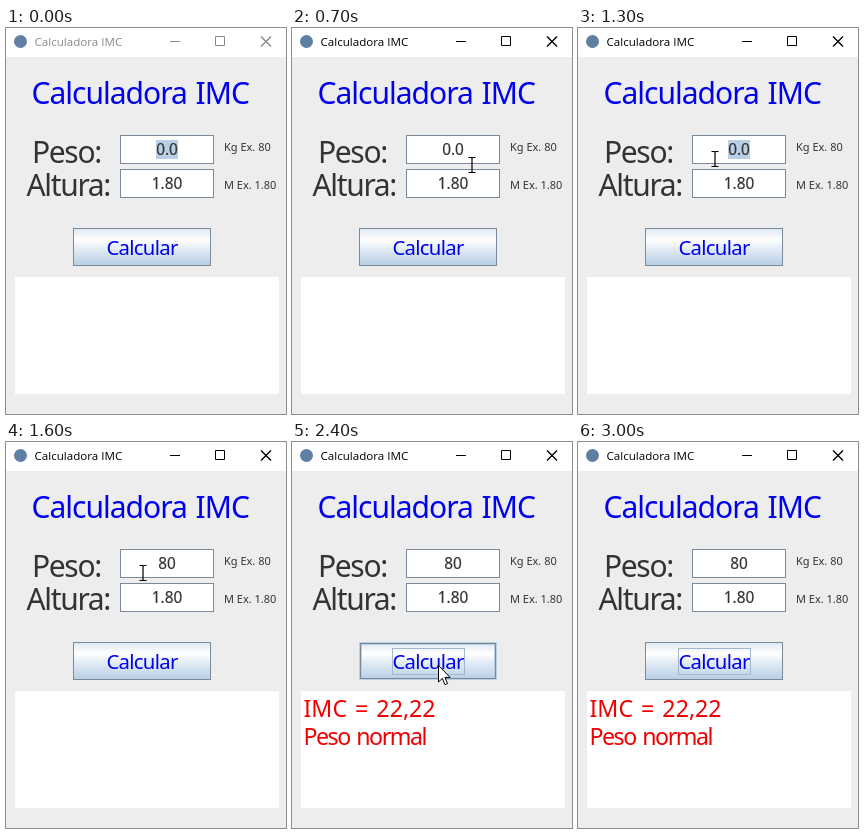
An HTML page for the animation above (3100 ms loop, 280 by 386 pixels).

```html
<!DOCTYPE html>
<html lang="es">
<head>
<meta charset="utf-8">
<title>Calculadora IMC</title>
<style>
html, body { margin: 0; width: 100%; height: 100%; overflow: hidden; background: #ededed; }
svg { display: block; width: 100vw; height: 100vh; }
text { font-family: "Noto Sans", "Open Sans", sans-serif; fill: #333; white-space: pre; }
.caption { font: 11.6px "Open Sans", "Noto Sans", sans-serif; }
.big { font-size: 30px; letter-spacing: -1px; word-spacing: 2px; }
.label { letter-spacing: -1.35px; }
.blue { fill: #00e; }
.hint { font-size: 11px; }
.value { font-size: 15.4px; text-anchor: middle; stroke: #333; stroke-width: .2; }
.out { font-size: 23.2px; fill: #f00000; word-spacing: 2px; }
.box { fill: #fff; stroke: #7a8a99; }
.edge { fill: none; stroke: #b8cfe5; }
</style>
</head>
<body>
<svg viewBox="0 0 280 386">
  <defs>
    <linearGradient id="ocean" x2="0" y2="1">
      <stop offset="0" stop-color="#dde8f3"/>
      <stop offset=".3" stop-color="#fff"/>
      <stop offset=".6" stop-color="#dde8f3"/>
      <stop offset="1" stop-color="#b8cfe5"/>
    </linearGradient>
  </defs>
  <rect width="280" height="386" fill="#ededed"/>
  <rect width="280" height="29" fill="#fff"/>
  <circle cx="14.5" cy="13.5" r="6.5" fill="#5f7fa3"/>
  <text id="caption" class="caption" x="28.5" y="18">Calculadora IMC</text>
  <g id="controls" fill="none">
    <path d="M164 13.5h10M209.5 8.5h9v9h-9z"/>
    <path d="M255 8.5l10 10m0-10l-10 10" stroke-width="1.4"/>
  </g>

  <text class="big blue" x="25.5" y="76">Calculadora IMC</text>
  <text class="big label" x="26" y="134.5">Peso:</text>
  <text class="big label" x="20.5" y="168">Altura:</text>
  <rect class="box" x="114.5" y="107.5" width="93" height="28"/>
  <rect class="box" x="114.5" y="141.5" width="93" height="28"/>
  <rect id="selection" y="112" height="19" fill="#b8cfe5"/>
  <text id="weight" class="value" x="161" y="127"></text>
  <text class="value" x="161" y="161">1.80</text>
  <text class="hint" x="218" y="123">Kg Ex. 80</text>
  <text class="hint" x="218" y="161">M Ex. 1.80</text>

  <rect x="67.5" y="200.5" width="137" height="37" fill="url(#ocean)" stroke="#7a8a99"/>
  <g id="hover">
    <rect class="edge" x="67.5" y="200.5" width="137" height="37"/>
    <rect class="edge" x="69.5" y="202.5" width="133" height="33"/>
    <rect x="68.5" y="201.5" width="135" height="35" fill="none" stroke="#7a8a99"/>
  </g>
  <rect id="focus" x="100.5" y="206.5" width="72" height="26" fill="none" stroke="#a3b8cc"/>
  <text class="blue" x="100.5" y="227" font-size="20.3" letter-spacing="-.7">Calcular</text>

  <rect x="9" y="249" width="264" height="117" fill="#fff"/>
  <g id="result">
    <text class="out" x="11.5" y="275">IMC = 22,22</text>
    <text class="out" x="11.5" y="303" letter-spacing="-1.5">Peso normal</text>
  </g>

  <path id="beam" d="M-3.5-7.5h2.5q1 0 1 1q0-1 1-1h2.5M0-6.5v13M-3.5 7.5h2.5q1 0 1-1q0 1 1 1h2.5" fill="none" stroke="#000" stroke-width="1.2"/>
  <path id="arrow" d="M.5.5v16.5l3.8-3.6 2.7 6.3 2.6-1.1-2.7-6.2h5.2z" fill="#fff" stroke="#000"/>
</svg>
<script>
const LOOP = 3100, STEP = 100;
const el = id => document.getElementById(id);
const show = (id, on) => el(id).setAttribute("visibility", on ? "visible" : "hidden");

// Pointer keys: time, x, y
const path = [
  [400, 240, 290], [500, 215, 153], [700, 180, 137], [900, 172, 134],
  [1200, 137, 131], [1700, 137, 131], [1900, 45, 165], [2000, 21, 188],
  [2100, 46, 202], [2300, 142, 222], [2400, 146, 223], [2500, 150, 222],
  [2900, 279, 82]
];

function pointer(t) {
  const i = path.findIndex(k => k[0] > t);
  if (i < 0) return path[path.length - 1].slice(1);
  const [a, b] = [path[Math.max(i - 1, 0)], path[i]];
  const p = Math.max(0, (t - a[0]) / (b[0] - a[0]));
  return [1, 2].map(n => a[n] + (b[n] - a[n]) * p);
}

function selectionStart(t) {
  if (t < 700) return 150;
  if (t < 900 || t >= 1400) return 172;
  return t < 1000 ? 163 : t < 1100 ? 159 : 150;
}

function draw(ms) {
  const t = Math.floor(ms % LOOP / STEP) * STEP;
  const active = t >= 700;
  el("caption").style.fill = active ? "#000" : "#888";
  el("controls").setAttribute("stroke", active ? "#000" : "#888");

  const left = selectionStart(t);
  el("selection").setAttribute("x", left);
  el("selection").setAttribute("width", 172 - left);
  el("weight").textContent = t < 1400 ? "0.0" : t < 1600 ? "8" : "80";

  const [x, y] = pointer(t);
  const inside = t >= 400 && t < 3000;
  const beam = t < 1800;
  for (const id of ["beam", "arrow"]) el(id).setAttribute("transform", `translate(${x} ${y})`);
  show("beam", inside && beam);
  show("arrow", inside && !beam);
  show("hover", inside && !beam && x > 67 && x < 205 && y > 200 && y < 238);
  show("focus", t >= 2400);
  show("result", t >= 2400);
}

const start = performance.now();
function tick() {
  draw(performance.now() - start);
  requestAnimationFrame(tick);
}
draw(0);
requestAnimationFrame(tick);
</script>
</body>
</html>
```
